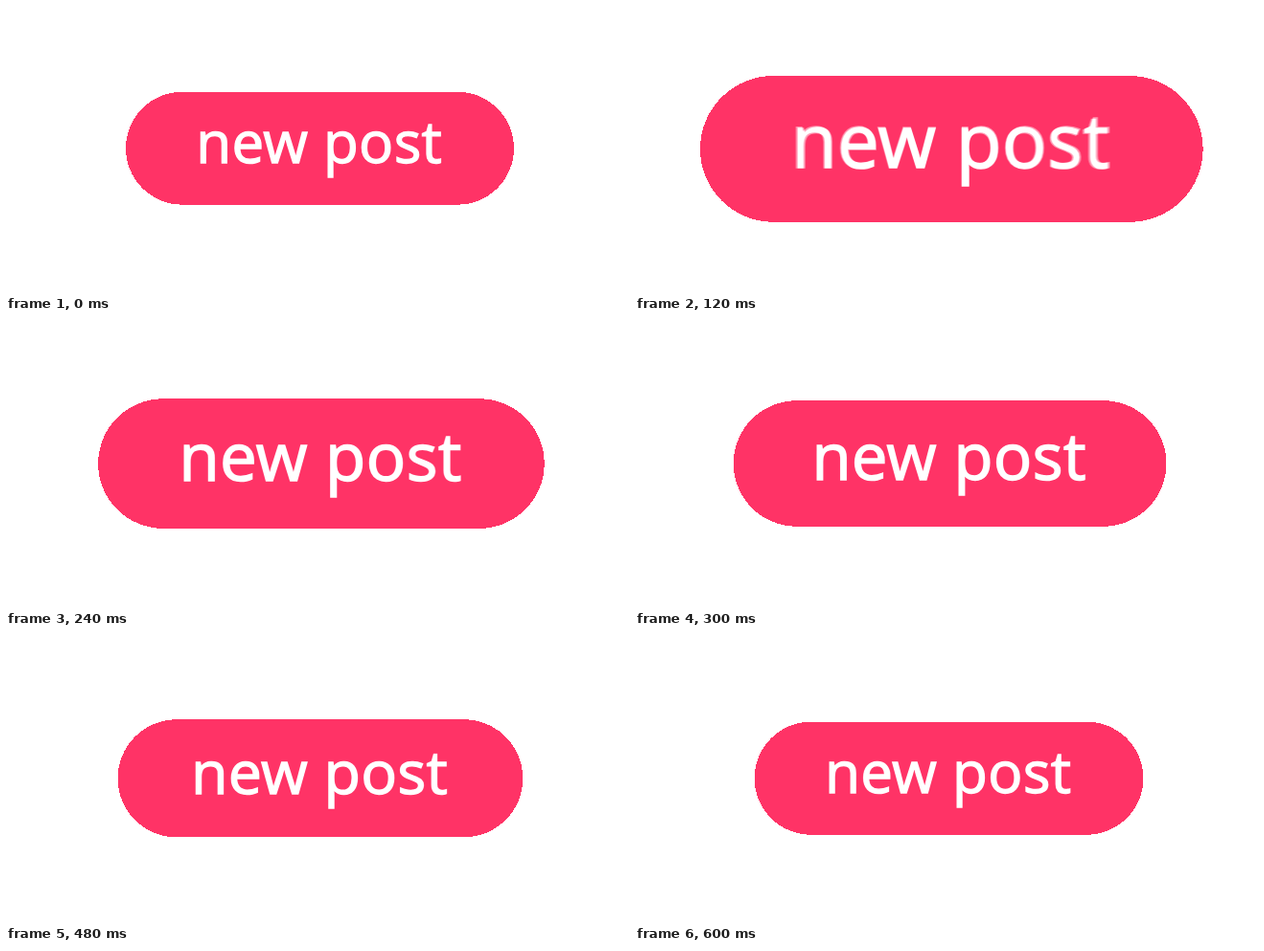
Animation of 650 by 300 pixels, one loop 0.69 s. Source, as an HTML page:

```html
<!DOCTYPE html>
<html lang="en">
<head>
<meta charset="utf-8">
<title>new post</title>
<style>
  html, body { margin: 0; width: 100%; height: 100%; overflow: hidden; background: #fff; }
  svg { display: block; isolation: isolate; }
  rect, text { transform-origin: 318px 146.3px; }
  rect { fill: #f36; shape-rendering: crispEdges; }
  /* Added together, the faint copies of (white - pink) give motion-blurred white text. */
  text {
    font: 400 60px "Open Sans", "Noto Sans", sans-serif;
    letter-spacing: 0.3px;
    fill: rgb(0, 204, 153);
    stroke: rgb(0, 204, 153);
    stroke-width: 1.3px;
    mix-blend-mode: plus-lighter;
  }
</style>
</head>
<body>
<svg id="stage" width="650" height="300">
  <rect x="125" y="89.75" width="405" height="117.9" rx="59"/>
</svg>
<script>
const LOOP = 690, STEP = 30, PEAK = 90, END = 605;
const SWELL = 0.373, SHUTTER = 15, COPIES = 4;

const stage = document.getElementById('stage');
const pill = stage.querySelector('rect');
const labels = Array.from({ length: COPIES }, () => {
  const label = document.createElementNS(stage.namespaceURI, 'text');
  label.setAttribute('x', 198.3);
  label.setAttribute('y', 164);
  label.style.opacity = 1 / COPIES;
  label.textContent = 'new post';
  return stage.appendChild(label);
});

// A quick eased swell, then a fast drop that turns into a steady settle.
function scaleAt(t) {
  if (t <= 0 || t >= END) return 1;
  if (t < PEAK) return 1 + SWELL * (1 - (1 - t / PEAK) ** 1.6);
  const u = (t - PEAK) / (END - PEAK);
  return 1 + SWELL * (0.475 * (1 - u) + 0.525 * Math.exp(-7.2 * u));
}

function setScale(element, t) {
  element.style.transform = `scale(${scaleAt(t)})`;
}

function draw(t) {
  const blur = t > 0 ? SHUTTER : 0;
  setScale(pill, t);
  labels.forEach((label, i) => setScale(label, t + ((i + 0.5) / COPIES - 0.5) * blur));
}

function tick() {
  const t = performance.now() % LOOP;
  draw(Math.floor(t / STEP) * STEP);
  requestAnimationFrame(tick);
}
tick();
</script>
</body>
</html>
```
